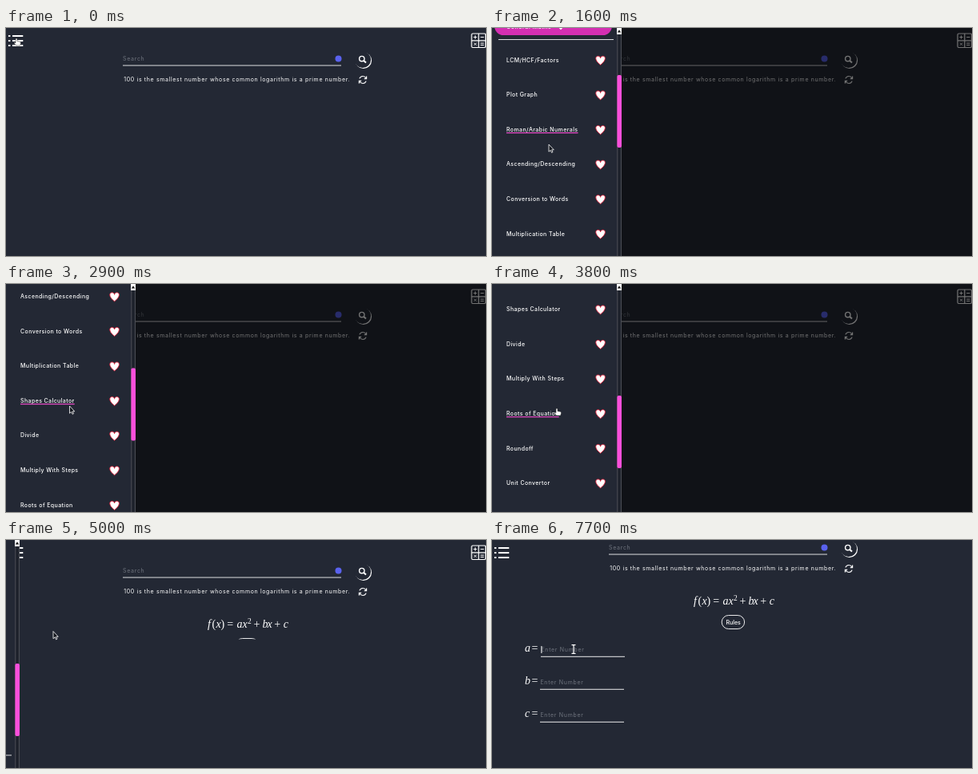
Write an HTML page that moves like this. It is 600 by 286 pixels and loops after 8 s.

```html
<!DOCTYPE html>
<html lang="en">
<head>
<meta charset="utf-8">
<title>Maths helper</title>
<style>
  html, body { margin: 0; width: 100%; height: 100%; overflow: hidden; background: #232834; }
  svg { display: block; width: 600px; height: 286px; }
  text { font: 500 7px Inter, sans-serif; fill: #fff; letter-spacing: .6px; white-space: pre; }
  .fact { font-weight: 400; letter-spacing: .65px; }
  .hint { font-weight: 400; fill: #6f747e; letter-spacing: .7px; }
  .sub { letter-spacing: .4px; }
  .rules { letter-spacing: 0; }
  .legal { font: 3.5px "Open Sans", sans-serif; letter-spacing: 0; }
  .math { font: 14px "Liberation Serif", serif; letter-spacing: 0; }
  .math .var { font-style: italic; }
  .math .sup { font-size: 9.5px; }
  .line { fill: none; stroke: #fff; }
</style>
</head>
<body>
<svg id="stage" viewBox="0 0 600 286">
  <defs>
    <clipPath id="revealClip"><rect id="reveal" y="90" width="600" height="0"/></clipPath>
    <clipPath id="listClip"><rect id="listBox" y="10" width="156" height="0"/></clipPath>
  </defs>
  <rect width="600" height="286" fill="#232834"/>

  <g id="page">
    <text class="hint" x="146" y="41">Search</text>
    <path class="line" d="M146 47H419" stroke-opacity=".85"/>
    <circle cx="415.5" cy="38.5" r="4" fill="#5a62ee"/>
    <circle cx="446.8" cy="40.8" r="10.3" fill="#fff"/>
    <circle cx="445.8" cy="39.8" r="10.3" fill="#232834"/>
    <g class="line" stroke-width="1.4">
      <circle cx="444.8" cy="38.6" r="3.2"/>
      <path d="M447.2 41L450 43.6" stroke-width="2"/>
    </g>
    <text class="fact" x="147.3" y="67.2">100 is the smallest number whose common logarithm is a prime number.</text>
    <g class="line" stroke-width="1.2">
      <path d="M441.9 63.4A4.4 4.4 0 0 1 450 63M450.1 66.6A4.4 4.4 0 0 1 442 67"/>
      <path d="M450.6 60.6V63.6H447.8M441.4 69.4V66.4H444.2"/>
    </g>
    <g class="line" stroke-width="1.2">
      <rect x="582" y="7" width="17.5" height="17.5" rx="1.5"/>
      <path d="M590.8 7V24.5M582 15.8H599.5"/>
      <path d="M584.4 11.5H588.6M586.5 9.4V13.6M593.2 11.5H597.4M585 18.7L588 21.7M588 18.7L585 21.7M593.2 19.1H597.4M593.2 21.4H597.4" stroke-width="1"/>
    </g>
    <g id="form" clip-path="url(#revealClip)">
      <rect class="line" x="287.2" y="123.5" width="28.4" height="17" rx="8.5" stroke-width=".9"/>
      <text class="rules" x="292.4" y="134.6">Rules</text>
    </g>
  </g>

  <path class="line" stroke-width="2" d="M3 10h2.4M8 10h13.3M3 16h2.4M8 16h13.3M3 22h2.4M8 22h13.3"/>
  <rect id="shade" width="600" height="286" fill="#000"/>

  <g id="side">
    <rect width="162" height="286" fill="#232834"/>
    <g id="menu">
      <rect x="3" y="-143" width="154" height="22" rx="11" fill="#d42fb2"/>
      <text x="18" y="-129.5">Home</text>
      <rect id="pill" x="3" height="23" rx="11.5" fill="#d42fb2"/>
      <g id="list" clip-path="url(#listClip)">
        <path class="line" d="M8 14.5H152M8 590H152" stroke-opacity=".85"/>
        <rect id="under" x="18" height="1.1" fill="#ff4fd8"/>
      </g>
      <g id="tail"></g>
    </g>
    <rect x="156" width="6" height="286" fill="#1d212b"/>
    <path class="line" d="M156.8 0V286M161.4 0V286" stroke-opacity=".28" stroke-width=".8"/>
    <rect x="156" width="6" height="8" fill="#fff"/>
    <path d="M156.8 5.6L159 2.2L161.2 5.6Z" fill="#111"/>
    <rect id="thumb" x="156.4" width="5.6" rx="2" fill="#fb4fdb"/>
  </g>

  <rect id="caret" x="61.4" y="133" width="1" height="9" fill="#fff"/>
  <g id="pointer">
    <path id="arrow" d="M0 0V9.2L2.2 7.3L3.5 10.3L5 9.6L3.7 6.8H6.3Z" fill="#15181f" stroke="#fff" stroke-width=".8"/>
    <path id="hand" d="M-1 .4Q0 -.6 1 .4V3.4L4.8 4.2Q5.7 4.6 5.5 6L4.7 9H-.4L-3 5.7Q-2.8 4.3 -1 5.6Z" fill="#fff" stroke="#222" stroke-width=".5"/>
    <path id="beam" class="line" d="M-2.5 -5.3H2.5M0 -5.3V5.3M-2.5 5.3H2.5" stroke-width="1.2"/>
  </g>
</svg>

<script>
const LOOP = 8000, STEP = 100;
const GENERAL_Y = -2, MAIN_GAP = 32.4, FIRST_Y = 40, ROW = 43.6, LIST_HEIGHT = 592;
const $ = id => document.getElementById(id);

function add(parent, tag, attrs, text) {
  const node = document.createElementNS("http://www.w3.org/2000/svg", tag);
  for (const key in attrs) node.setAttribute(key, attrs[key]);
  if (text) node.textContent = text;
  parent.appendChild(node);
  return node;
}
const set = (node, key, value) => node.setAttribute(key, value);
const show = (node, on) => set(node, "visibility", on ? "visible" : "hidden");
const move = (node, x, y) => set(node, "transform", `translate(${x} ${y})`);
const mix = (a, b, k) => a + (b - a) * k;

// Linear value between [time, value] steps.
function at(steps, t) {
  if (t <= steps[0][0]) return steps[0][1];
  for (let i = 1; i < steps.length; i++) {
    const [t0, a] = steps[i - 1], [t1, b] = steps[i];
    if (t <= t1) return mix(a, b, (t - t0) / (t1 - t0));
  }
  return steps[steps.length - 1][1];
}

// Formula and inputs
function math(glyphs, xs, y) {
  const text = add($("form"), "text", { class: "math" });
  [...glyphs].forEach((g, i) => {
    const sup = g === "2";
    const kind = sup ? "sup" : /[a-z]/.test(g) ? "var" : "op";
    add(text, "tspan", { x: xs[i], y: sup ? y - 5 : y, class: kind }, g);
  });
}
math("f(x)=ax2+bx+c", [252, 257.6, 262.4, 268.6, 276.2, 288.6, 295.4, 302, 309.4, 320.6, 326.4, 335.2, 346.8], 110);
["a", "b", "c"].forEach((name, i) => {
  const y = 169 + i * 41.2, x = i ? 60 : 61;
  math(name + "=", [41, 49.6], y);
  add($("form"), "text", { class: "hint", x: x + .4, y: y - .4 }, "Enter Number");
  add($("form"), "path", { class: "line", d: `M${x} ${Math.round(y + 6) + .3}h105`, "stroke-opacity": .9 });
});

// Main menu entries; those with a chevron give its centre
const groups = [["Linear Algebra", 86], ["Calculus", 62], ["Trignometry", 75], ["General Maths", 86]]
  .map(([label, chevron], i) => {
    const y = GENERAL_Y + (i - 3) * MAIN_GAP;
    add($("menu"), "text", { x: 18, y: y + 2.5 }, label);
    add($("menu"), "path", { class: "line", d: `M${chevron - 4} ${y - 1}l4 4l4 -4`, "stroke-width": 1.9 });
    return { y, width: chevron + 16 };
  });
["About", "Contact", "Share to Zondrilo", "Settings"].forEach((label, i) =>
  add($("tail"), "text", { x: 18, y: GENERAL_Y + (i + 1) * MAIN_GAP + 2.5 }, label));
add($("tail"), "circle", { cx: 96, cy: 95, r: 4.2, fill: "#2fc351" });
add($("tail"), "text", { class: "legal", x: 3, y: 161 }, "Copyright © 2021 Turns Sums Light. All Rights Reserved.");

// Tool list
const HEART = "c-8 -6.2 -6.4 -11 -3 -11c1.8 0 3 1.4 3 2.6c0 -1.2 1.2 -2.6 3 -2.6c3.4 0 5 4.8 -3 11z";
const tools = ["LCM/HCF/Factors", "Plot Graph", "Roman/Arabic Numerals", "Ascending/Descending",
  "Conversion to Words", "Multiplication Table", "Shapes Calculator", "Divide", "Multiply With Steps",
  "Roots of Equation", "Roundoff", "Unit Convertor", "Percentage"].map((label, i) => {
    const y = FIRST_Y + i * ROW;
    add($("list"), "path", { d: `M135.6 ${y + 6.3}${HEART}`, fill: "#fff", stroke: "#e5203a", "stroke-width": .9 });
    return add($("list"), "text", { class: "sub", x: 18, y: y + 2.5 }, label);
  });

const motion = {
  side: [[0, -165], [500, 0], [4500, 0], [5000, -145], [5100, -165]],
  shade: [[0, 0], [500, .55], [4500, .55], [4900, 0]],
  open: [[1000, 0], [1300, 1]],
  scroll: [[500, -158], [800, -122], [1300, -122], [1600, 0], [1900, 18], [2400, 90], [2900, 155.3],
    [3100, 172], [3200, 172], [3800, 270], [4100, 320]],
  reveal: [[4600, 90], [5000, 124.6], [5300, 200], [5600, 270]],
  page: [[5400, 0], [5800, -29]],
  x: [[300, 13], [900, 56], [1300, 58], [1600, 71], [2900, 79.5], [3800, 81], [4100, 72], [4300, 59],
    [5000, 59], [5900, 240], [6500, 102]],
  y: [[300, 13], [900, 110], [1300, 112], [1600, 146], [2900, 153], [3800, 156], [4100, 140], [4300, 114.5],
    [5000, 114.5], [5900, 150], [6500, 137]]
};

function draw(t) {
  const now = {};
  for (const key in motion) now[key] = at(motion[key], t);
  const { side, open, scroll, x, y } = now;

  move($("page"), 0, now.page);
  set($("reveal"), "height", now.reveal - 90);
  set($("shade"), "opacity", now.shade);
  show($("side"), side > -163);
  move($("side"), side, 0);
  move($("menu"), 0, -scroll);
  move($("tail"), 0, open * LIST_HEIGHT);
  set($("listBox"), "height", open * LIST_HEIGHT);

  set($("thumb"), "y", mix(8 + .92 * (scroll + 158), 59 + .3 * scroll, open));
  set($("thumb"), "height", mix(260, 91, open));

  // Hover follows the pointer inside the open menu
  const inside = side === 0, menuY = y + scroll;
  const row = Math.round((menuY - FIRST_Y) / ROW);
  const tool = inside && open === 1 && menuY > 16 ? tools[row] : null;
  show($("under"), tool);
  if (tool) {
    set($("under"), "y", FIRST_Y + row * ROW + 3.8);
    set($("under"), "width", tool.getComputedTextLength());
  }
  const group = open ? groups[3] : inside && groups.find(g => Math.abs(menuY - g.y) < 13);
  show($("pill"), group);
  if (group) {
    set($("pill"), "y", group.y - 11.5 + (open ? -.5 : 0));
    set($("pill"), "width", mix(group.width, 147, open));
  }

  const onMenuIcon = x < 22 && y < 26;
  const onTool = tool && Math.abs(menuY - FIRST_Y - row * ROW) <= 6.5;
  const hand = onMenuIcon || onTool || (inside && group && Math.abs(menuY - group.y) < 13);
  const beam = t > 5900 && x < 166;
  move($("pointer"), x, y);
  show($("hand"), hand);
  show($("beam"), beam);
  show($("arrow"), !hand && !beam);
  show($("caret"), t >= 6500 && Math.floor((t - 6500) / 600) % 2 === 0);
}

const start = performance.now();
function tick() {
  const t = (performance.now() - start) % LOOP;
  draw(Math.floor(t / STEP) * STEP);
  requestAnimationFrame(tick);
}
tick();
</script>
</body>
</html>
```
